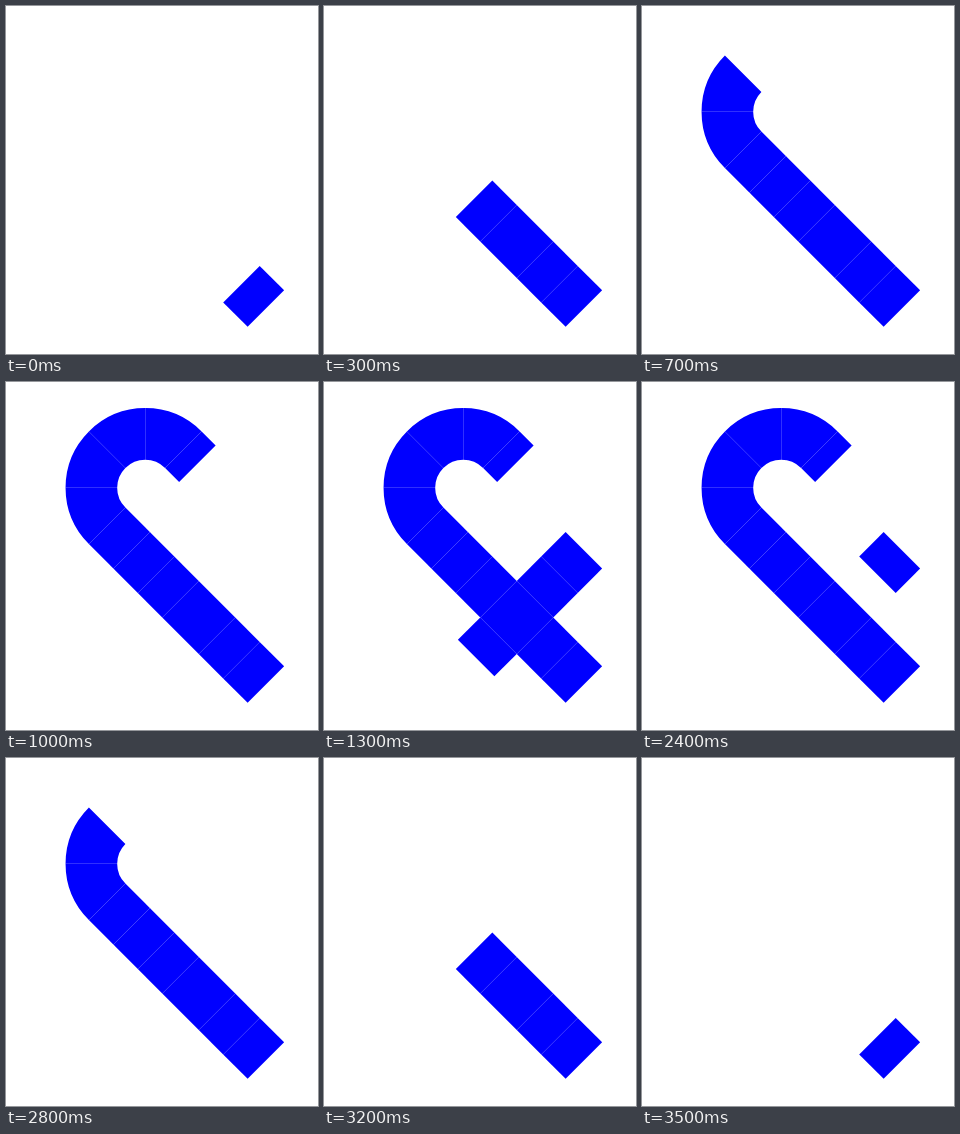
These frames come from a looping animation (312x348 px, 3600 ms). An HTML page with a canvas:

```html
<!DOCTYPE html>
<html lang="en">
<head>
<meta charset="utf-8">
<title>Ribbon</title>
<style>
html, body { margin: 0; width: 100%; height: 100%; overflow: hidden; background: #fff; }
canvas { display: block; }
</style>
</head>
<body>
<canvas id="stage" width="312" height="348"></canvas>
<script>
const ctx = document.getElementById('stage').getContext('2d');
const STEP = 100, LOOP = 3600, RADIUS = 53.88;
const pieces = [];

// Diagonal run through successive x positions, with y = slope * x + offset
function run(slope, offset, ...xs) {
  for (let i = 1; i < xs.length; i++) {
    pieces.push(() => {
      ctx.moveTo(xs[i - 1], slope * xs[i - 1] + offset);
      ctx.lineTo(xs[i], slope * xs[i] + offset);
    });
  }
}

// Bend of four eighth-turns, starting at the given eighth
function bend(x, y, first) {
  for (let i = first; i < first + 4; i++) {
    pieces.push(() => ctx.arc(x, y, RADIUS, i * Math.PI / 4, (i + 1) * Math.PI / 4));
  }
}

run(1, 42.7, 259.9, 235.45, 211, 174.5, 150.05, 125.6, 101.15);
bend(139.25, 105.75, 3);
run(1, -109.7, 177.35, 191.35);
run(-1, 428.2, 259.9, 235.45, 211);
run(-1, 428.2, 174.5, 152.1);
bend(114, 238, 1);

ctx.strokeStyle = '#00f';
ctx.lineWidth = 36.5 * Math.SQRT2;

function draw(time) {
  const step = Math.floor(time % LOOP / STEP);
  const count = Math.min(step + 1, LOOP / STEP - step);
  ctx.clearRect(0, 0, 312, 348);
  for (const trace of pieces.slice(0, count)) {
    ctx.beginPath();
    trace();
    ctx.stroke();
  }
}

const start = performance.now();
function tick() {
  draw(performance.now() - start);
  requestAnimationFrame(tick);
}
tick();
</script>
</body>
</html>
```
